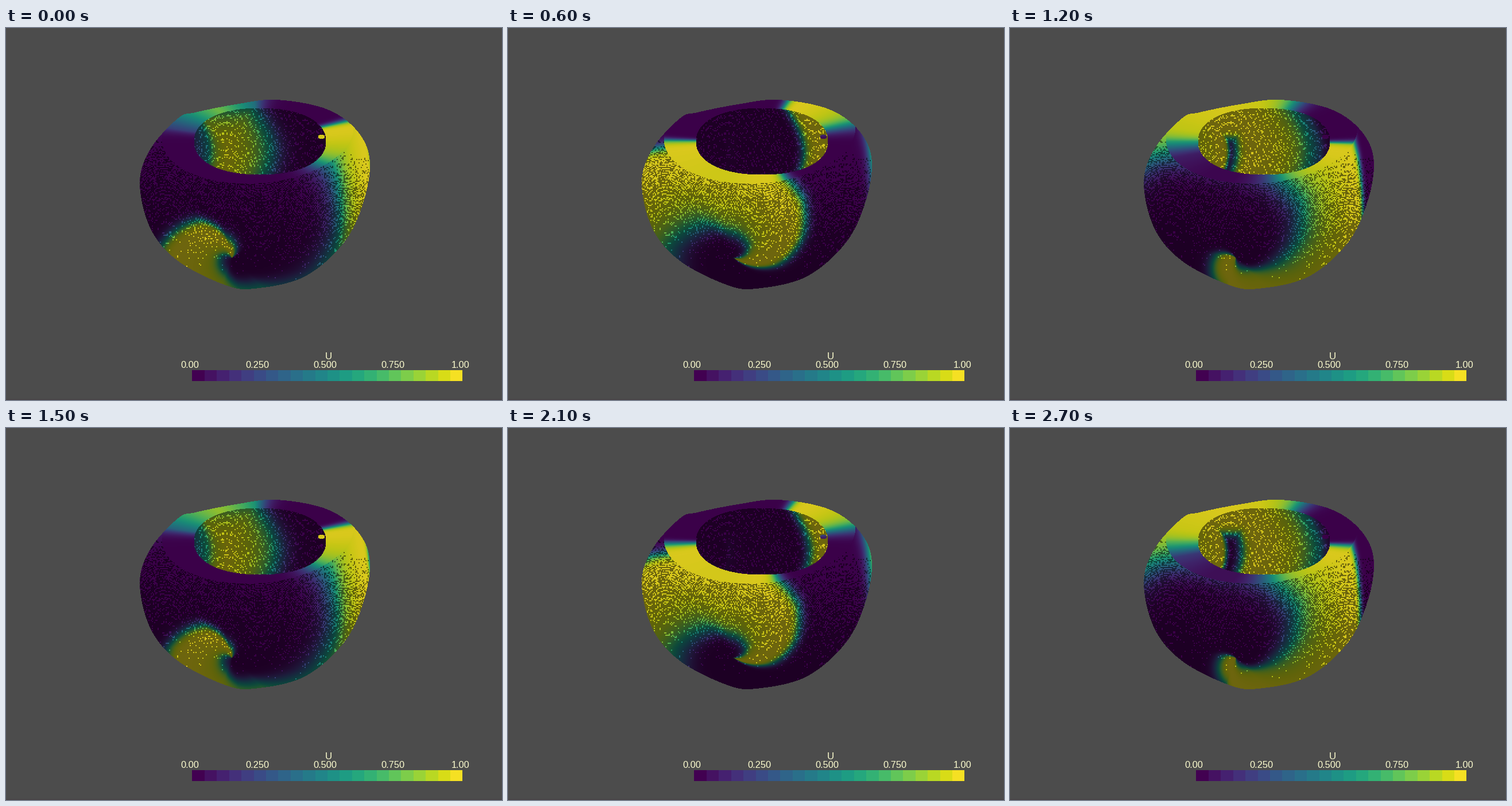
These frames come from a looping animation (864 px wide and 648 px high, 3000 ms). A matplotlib script:

```python
import numpy as np
import matplotlib.pyplot as plt
from matplotlib.animation import FuncAnimation
from matplotlib.path import Path

W, H, DPI = 864, 648, 100
FRAMES, INTERVAL = 10, 300
PERIOD = 5.0        # one turn of the wave, in time units
STEP = 0.97         # time units per frame
DURATION = 2.2      # how long a point stays excited
INK = "#fafacd"
FLAT, DARK = 0.87, 0.44

X, Y = np.meshgrid(np.arange(W), np.arange(H))
rng = np.random.default_rng(4)


def smooth(points, n=12):
    """Closed Catmull-Rom curve through the points."""
    p = np.array(points, float)[:, None]
    p0, p2, p3 = (np.roll(p, s, axis=0) for s in (1, -1, -2))
    u = (np.arange(n) / n)[None, :, None]
    curve = 0.5 * (2 * p + (p2 - p0) * u + (2 * p0 - 5 * p + 4 * p2 - p3) * u**2
                   + (3 * p - p0 - 3 * p2 + p3) * u**3)
    return curve.reshape(-1, 2)


def inside(outline):
    pixels = np.column_stack([X.ravel() + 0.5, Y.ravel() + 0.5])
    return Path(outline).contains_points(pixels).reshape(H, W)


def ellipse(cx, cy, rx, ry, tilt=0, power=2):
    dx, dy = X - cx, Y - cy + tilt * (X - cx)
    return abs(dx / rx) ** power + abs(dy / ry) ** power < 1


def angle(dx, dy, lowest):
    """Angle in degrees, clockwise on screen, within a turn from lowest."""
    return (np.degrees(np.arctan2(dy, dx)) - lowest) % 360 + lowest


def rim_time():
    """The wave leaves the front, runs both ways round and meets at the back."""
    a = angle((X - 440) / 140, (Y - 197) / 67, -122)
    return np.interp(a, [-122, -93, -25, 5, 40, 87, 110, 128, 159, 180, 197, 238],
                     [8.2, 7.8, 4.95, 3.73, 2.8, 1.53, 1, 1, 1.3, 1.87, 2.6, 3.2])


def inner_time():
    """Two fronts on the far wall, each bowed to the right, that collide."""
    u = X - 30 * np.sin(np.pi * (Y - 140) / 150)
    t = np.interp(u, [300, 322, 355, 372, 433, 488, 512, 540],
                  [2.6, 2.85, 4.0, 3.73, 2.85, 1.87, 1.53, 0.65])
    return np.minimum(t, 3.3 + (Y - 160) / 60)


def outer_time(radius):
    """A spiral: turn about the core plus a delay that grows with distance."""
    a = angle(X - CORE[0], Y - CORE[1], -170)
    turn = np.interp(a, [-170, -130, -104, -40, -17, 10, 44, 77, 111, 190],
                     [-1.56, -1.1, -0.5, -0.05, 0.35, 0.97, 2.05, 2.45, 3.1, 3.44])
    edge = 1.2 * np.clip((X - 560) / 75, 0, None) ** 2
    return turn + 0.0125 * radius + edge


def outer_depth(x, y):
    fall = 1 - (y - 230 + 0.15 * (432 - x)) / 230
    return 15 * np.cos((x - 280) / 50) - 28 * np.clip(fall, 0, None) ** 3


def inner_depth(x, y):
    return 8 * np.cos((x - 380) / 50) + 0.07 * y


def voxel_shade(depth):
    """Bright voxel tops wherever the depth steps between two layers."""
    x, y = X // 2 * 2, Y // 2 * 2
    rough = 0.6 * rng.random((H // 2, W // 2)).repeat(2, axis=0).repeat(2, axis=1)
    top = np.floor(depth(x, y + 2) + rough) > np.floor(depth(x, y) + rough)
    return np.where(top, FLAT, DARK)


def sigmoid(v):
    return 1 / (1 + np.exp(-np.clip(v, -60, 60)))


CORE = (393, 400)
body = inside(smooth([(470, 125), (400, 133), (330, 147), (300, 157), (252, 210),
                      (233, 270), (252, 350), (300, 406), (380, 447), (432, 454),
                      (520, 433), (590, 372), (625, 295), (633, 225), (608, 175),
                      (555, 140)]))
bump = ellipse(549, 189, 6, 4)
hole = ellipse(442, 197, 115, 58, power=2.2) & ~bump
above = (Y < 183 - 0.06 * (X - 438)) & (abs(X - 438) < 167)
rim = (ellipse(438, 183, 167, 87, tilt=0.06) | above) & body & ~hole

radius = np.hypot(X - CORE[0], Y - CORE[1])
start = np.where(hole, inner_time(), np.where(rim, rim_time(), outer_time(radius)))
lasting = DURATION - np.exp(-(radius / 40) ** 2)
shade = np.where(hole, voxel_shade(inner_depth),
                 np.where(rim, FLAT, voxel_shade(outer_depth)))
start, lasting, shade = start[body], lasting[body], shade[body]

viridis = plt.get_cmap("viridis")
stage = np.full((H, W, 3), 76 / 255)
stage[646:] = np.array([72, 68, 71]) / 255
BANDS = 22
bar = np.floor(np.arange(471) / 471 * BANDS) / (BANDS - 1)
stage[596:615, 324:795] = viridis(bar)[:, :3] * 0.97


def render(k):
    since = (k * STEP - start + 1) % PERIOD - 1
    rise = sigmoid(since / 0.07)
    fall = sigmoid((lasting - since) / 0.19) * (1 - 0.03 * since**2)
    picture = stage.copy()
    picture[body] = viridis(rise * fall)[:, :3] * shade[:, None]
    return picture


fig = plt.figure(figsize=(W / DPI, H / DPI), dpi=DPI)
ax = fig.add_axes([0, 0, 1, 1])
ax.axis("off")
image = ax.imshow(render(0), extent=(0, W, H, 0), interpolation="nearest",
                  aspect="auto")


def label(x, y, text, px):
    ax.text(x, y, text, color=INK, family="Liberation Sans", ha="center",
            va="baseline", fontsize=px * 72 / DPI)


for i, text in enumerate(("0.00", "0.250", "0.500", "0.750", "1.00")):
    label(320.5 + 117.8 * i, 591.5, text, 16.4)
label(561.5, 577, "U", 17)


def update(k):
    image.set_data(render(k))
    return [image]


anim = FuncAnimation(fig, update, frames=FRAMES, interval=INTERVAL,
                     repeat=True, repeat_delay=0)
plt.show()
```
